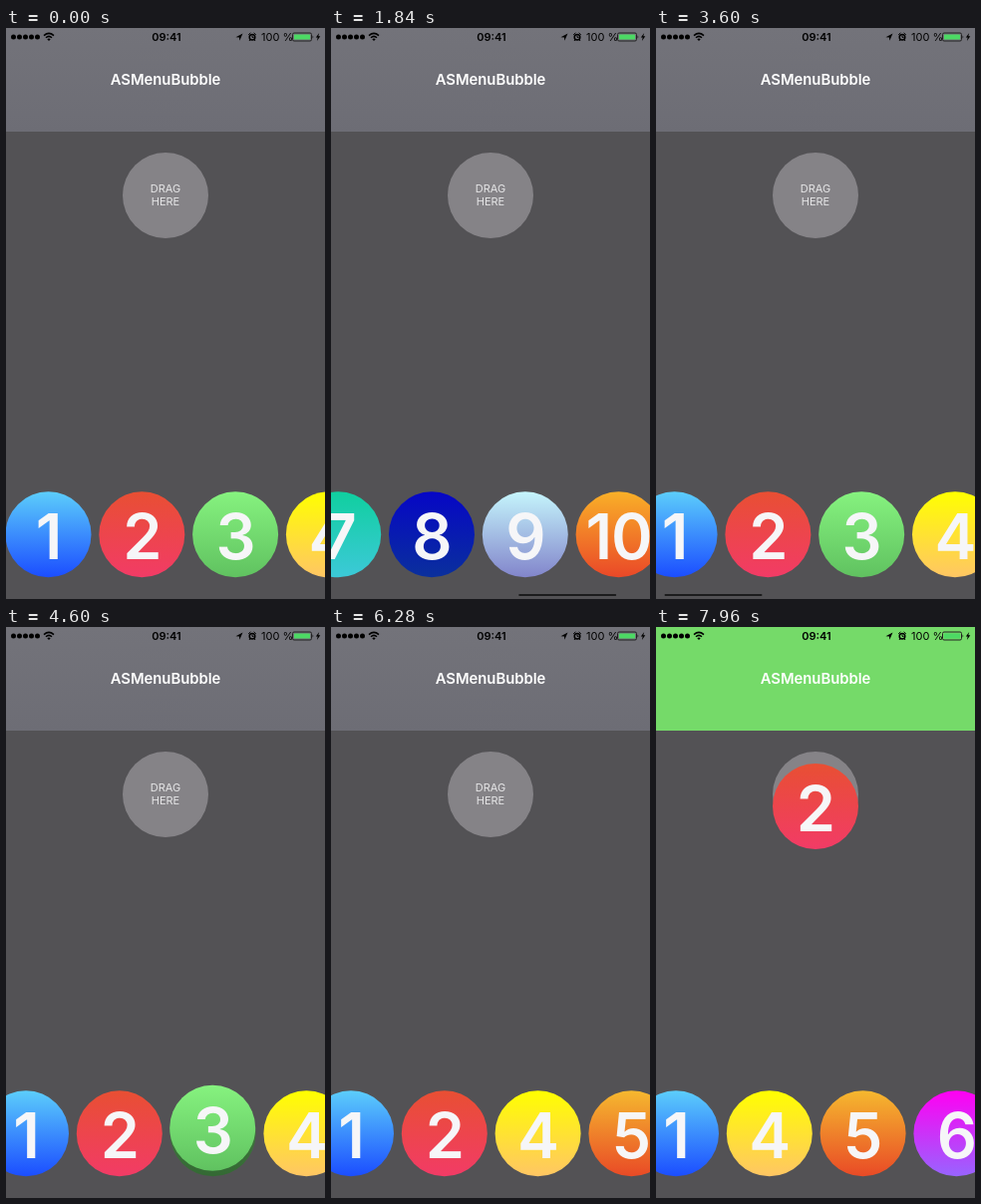
Recreate the animation shown at these times as an HTML page. Size 320 by 573 pixels, loop 8000 ms.

```html
<!DOCTYPE html>
<html lang="en">
<head>
<meta charset="utf-8">
<title>Bubble menu</title>
<style>
  html, body { margin: 0; width: 100%; height: 100%; overflow: hidden; background: #535255; }
  #stage { position: relative; width: 320px; height: 573px; overflow: hidden; background: #535255;
    font-family: Inter, "Liberation Sans", sans-serif; }
  #stage > * { position: absolute; }
  header, #green { left: 0; top: 0; width: 320px; height: 104px; }
  header { background: linear-gradient(#73737a, #6d6d75); }
  #green { background: #75da69; opacity: 0; }
  #status { left: 0; top: 0; }
  h1 { margin: 0; left: 0; top: 42px; width: 320px; line-height: 20px; text-align: center;
    font-size: 14.8px; font-weight: 600; color: #fff; }
  #target { left: 117px; top: 125px; width: 86px; height: 86px; border-radius: 50%;
    box-sizing: border-box; padding-top: 30px; background: #858387; color: #e6e6e7;
    font-size: 11px; line-height: 13.4px; text-align: center; }
  .bubble { left: -43px; top: -43px; width: 86px; height: 86px; border-radius: 50%;
    font-size: 63px; font-weight: 600; line-height: 90px; text-align: center;
    letter-spacing: -1px; color: #f6f6f8; white-space: nowrap; }
  #bar { left: 0; top: 568px; width: 98px; height: 2px; border-radius: 1px; background: #1c1c1d; }
</style>
</head>
<body>
<div id="stage">
  <header></header>
  <div id="green"></div>
  <svg id="status" width="320" height="20" font-family="Inter, sans-serif" font-size="11">
    <g id="dots"></g>
    <g fill="none" stroke="#000" stroke-width="1.5">
      <path d="M38 7.6Q43 3.2 48 7.6M40 9.7Q43 7 46 9.7"/>
    </g>
    <path d="M41.3 11.2Q43 9.8 44.7 11.2L43 13Z"/>
    <text x="161" y="13" text-anchor="middle" font-weight="600">09:41</text>
    <path d="M230.5 9.3L237.5 5.5L234.3 12.8L234 9.5Z"/>
    <circle cx="247" cy="9.2" r="2.8" fill="none" stroke="#000" stroke-width="1.5"/>
    <path d="M243.2 6.8L245.4 4.9M250.8 6.8L248.6 4.9M247 7.5V9.4H248.6M245 11.5L244 13M249 11.5L250 13"
      fill="none" stroke="#000"/>
    <text x="256" y="13">100 %</text>
    <rect x="287.5" y="5" width="19" height="8" rx="1.5" fill="none" stroke="#222"/>
    <rect x="289" y="6.4" width="16" height="5.2" rx=".6" fill="#4cd964"/>
    <path d="M307.6 7.4Q309.2 9 307.6 10.6Z"/>
    <path d="M314.2 5L310.8 9.6H312.7L311.9 13L315.3 8.3H313.3Z"/>
  </svg>
  <h1>ASMenuBubble</h1>
  <div id="target">DRAG<br>HERE</div>
  <div id="bar"></div>
</div>
<script>
const LOOP = 8000, STEP = 40, PITCH = 93.8, FIRST_X = 42.5, ROW_Y = 508.3;
const colors = [
  ['#5ccdfb', '#1b4dff'], ['#e84f33', '#f23b66'], ['#86f27f', '#60c260'],
  ['#ffff00', '#ffc664'], ['#f5b82f', '#e94a26'], ['#ff00f2', '#9864ff'],
  ['#10cf9f', '#3cc9d8'], ['#0606c6', '#0a309c'], ['#c5f5fc', '#8285cb'],
  ['#f9b028', '#ea4828'], ['#c644fc', '#5856d6']
];
// Each drag: bubble index, lift time, gap closing time, release time, path of [ms, x, y].
const drags = [
  { index: 2, lift: 4400, close: 5010, drop: 5820,
    path: [[4400, 207.6, ROW_Y], [4700, 207, 500], [4950, 203, 412], [5200, 194, 300.5],
           [5420, 174, 210], [5640, 160, 170]] },
  { index: 1, lift: 6880, close: 7420, drop: Infinity,
    path: [[6880, 113.8, ROW_Y], [7160, 115, 500], [7400, 126, 408], [7620, 142, 292],
           [7800, 154, 212], [7960, 160, 180]] }
];
const stage = document.getElementById('stage');
const green = document.getElementById('green');
const bar = document.getElementById('bar');

const progress = (t, from, length) => Math.min(1, Math.max(0, (t - from) / length));
const smooth = p => p * p * (3 - 2 * p);
const mix = (a, b, p) => a + (b - a) * p;

function makeBubble(index) {
  const el = document.createElement('div');
  el.className = 'bubble';
  el.textContent = index + 1;
  el.style.background = `linear-gradient(${colors[index]})`;
  return stage.appendChild(el);
}

function place(el, x, y, scale = 1) {
  el.style.transform = `translate(${x}px, ${y}px) scale(${scale})`;
}

function along(path, t) {
  const next = path.findIndex(p => p[0] > t);
  if (next < 0) return path[path.length - 1].slice(1);
  if (next === 0) return path[0].slice(1);
  const a = path[next - 1], b = path[next];
  const p = (t - a[0]) / (b[0] - a[0]);
  return [mix(a[1], b[1], p), mix(a[2], b[2], p)];
}

// Flick forward with decay, drag back, then ease to rest.
function scrollAt(t) {
  if (t < 400) return 230 * progress(t, 120, 280) ** 1.2;
  if (t < 2480) return 620 - 390 * Math.exp((400 - t) / 500);
  if (t < 2720) return mix(614, 415.5, progress(t, 2480, 240) ** 1.4);
  return 22.5 + 393 * (1 - progress(t, 2720, 1040)) ** 3;
}

const cells = colors.map((_, i) => makeBubble(i));
for (const drag of drags) drag.el = makeBubble(drag.index);
document.getElementById('dots').innerHTML =
  [0, 1, 2, 3, 4].map(i => `<circle cx="${7.5 + 6 * i}" cy="9" r="2.5"/>`).join('');

function draw(t) {
  const scroll = scrollAt(t);
  cells.forEach((el, i) => {
    let shift = 0;
    for (const d of drags) if (i > d.index) shift += smooth(progress(t, d.close, 300));
    place(el, FIRST_X + PITCH * (i - shift) - scroll, ROW_Y);
    const drag = drags.find(d => d.index === i);
    const lifted = drag && t >= drag.lift;
    el.style.filter = lifted ? 'brightness(.54)' : 'none';
    el.style.opacity = lifted ? 1 - progress(t, drag.close + 100, 200) : 1;
  });

  let glow = 0;
  for (const d of drags) {
    const [x, y] = along(d.path, t);
    const leave = progress(t, d.drop, 200);
    place(d.el, x, y, 1 - smooth(leave));
    d.el.style.opacity = t < d.lift ? 0 : 1 - leave;
    const reach = d.path[d.path.length - 2][0];
    glow = Math.max(glow, progress(t, reach, 120) * (1 - leave));
  }
  green.style.opacity = glow;

  bar.style.transform = `translateX(${scroll * 0.313 + 1}px)`;
  bar.style.opacity = progress(t, 120, 80) * (1 - progress(t, 3760, 240));
}

function tick(now) {
  const t = now % LOOP;
  draw(t - t % STEP);
  requestAnimationFrame(tick);
}
draw(0);
requestAnimationFrame(tick);
</script>
</body>
</html>
```
